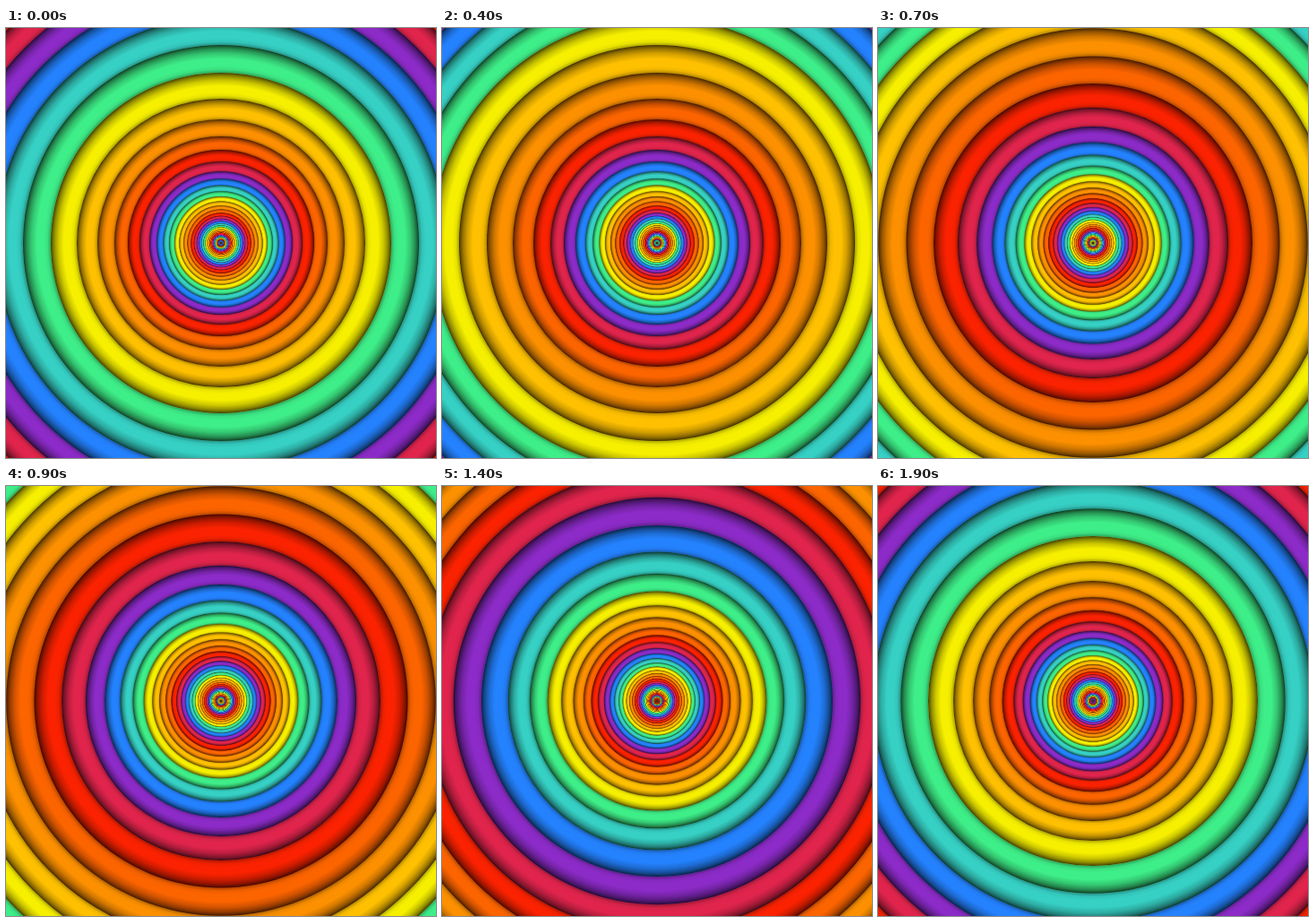
Recreate the animation shown at these times as an HTML page with a canvas. Size 480 px wide and 480 px high, loop 2 s.

```html
<!DOCTYPE html>
<html lang="en">
<head>
<meta charset="utf-8">
<title>Rainbow tunnel</title>
<style>
  html, body { margin: 0; width: 100%; height: 100%; overflow: hidden; background: #000; }
  canvas { display: block; width: 100vmin; height: 100vmin; }
</style>
</head>
<body>
<canvas id="stage" width="480" height="480"></canvas>
<script>
const ctx = document.getElementById('stage').getContext('2d');
const CENTER = 240;
const COLORS = ['#f6ef00', '#3eee88', '#36d0c4', '#2482ff', '#8c2bc8',
                '#e0244c', '#fa2200', '#fc6400', '#fc9000', '#fec000'];

// Ring radii from index -6 outwards; smaller rings shrink exponentially.
const RADII = [71.5, 80, 91, 104, 119, 138, 161, 190, 221, 252, 281, 309, 337, 364, 390, 415];

function radiusAt(index) {
  if (index <= -5) return 80 * Math.exp(0.108 * (index + 5));
  const i = Math.floor(index), u = index - i;
  const [a, b, c, d] = RADII.slice(i + 5, i + 9);
  return b + u / 2 * (c - a + u * (2 * a - 5 * b + 4 * c - d + u * (3 * (b - c) + d - a)));
}

// Darkness across a band, from its inner edge (0) to its outer edge (1).
const SHADE = [[0, 0.3], [0.12, 0.06], [0.25, 0], [0.5, 0], [0.7, 0.17], [0.86, 0.4], [0.95, 0.6], [1, 0.78]];

function disc(radius, fill) {
  ctx.fillStyle = fill;
  ctx.beginPath();
  ctx.arc(CENTER, CENTER, radius, 0, Math.PI * 2);
  ctx.fill();
}

function drawRing(inner, outer, color) {
  const shade = ctx.createRadialGradient(CENTER, CENTER, inner, CENTER, CENTER, outer);
  for (const [stop, alpha] of SHADE) shade.addColorStop(stop, `rgba(0,0,0,${alpha})`);
  disc(outer, color);
  disc(outer, shade);
}

function draw(time) {
  const tick = Math.floor(time % 2000 / 100);
  const travel = Math.round(tick * 49 / 19) / 5;
  const whole = Math.floor(travel), part = travel - whole;
  for (let slot = 7; slot > -37; slot--) {
    const color = COLORS[(slot - whole + 99) % 10];
    drawRing(radiusAt(slot - 1 + part), radiusAt(slot + part), color);
  }
  disc(1.6, '#403018');
}

const start = performance.now();
function loop() {
  draw(performance.now() - start);
  requestAnimationFrame(loop);
}
loop();
</script>
</body>
</html>
```
